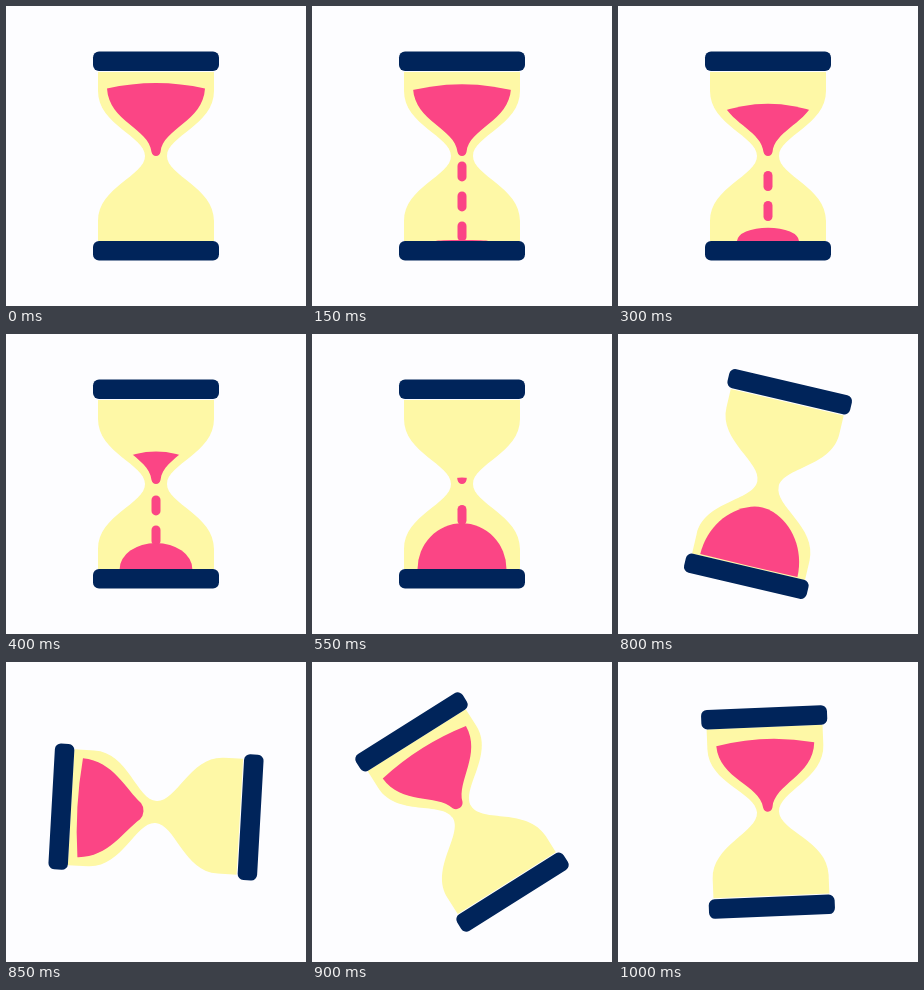
Animation of 300 by 300 pixels, one loop 1.05 s. Source, as an HTML page with a canvas:

```html
<!DOCTYPE html>
<html lang="en">
<head>
<meta charset="utf-8">
<title>Hourglass</title>
<style>
  html, body { margin: 0; width: 100%; height: 100%; overflow: hidden; background: #fdfdff; }
  canvas { display: block; width: 300px; height: 300px; }
</style>
</head>
<body>
<canvas id="stage" width="300" height="300"></canvas>
<script>
const ctx = document.getElementById('stage').getContext('2d');
const LOOP = 1050, STEP = 50, TURN = 750;
const PAPER = '#fdfdff', NAVY = '#00245a', GLASS = '#fef8a6', SAND = '#fb4585';

const clamp = v => Math.min(1, Math.max(0, v));
const span = (t, a, b) => clamp((t - a) / (b - a));
const smooth = s => s * s * (3 - 2 * s);
const mix = (a, b, k) => a + (b - a) * k;

// Cubic timing curve with control points (x1, 0) and (x2, 1)
function ease(x, x1, x2) {
  let lo = 0, hi = 1;
  for (let i = 0; i < 30; i++) {
    const s = (lo + hi) / 2, r = 1 - s;
    if (3 * r * r * s * x1 + 3 * r * s * s * x2 + s * s * s < x) lo = s; else hi = s;
  }
  return smooth(lo);
}

// Half outlines around the centre: corner, two controls, shoulder, tip control, tip, base control
const FUNNEL = [-49, -67.5, -47, -34, -7, -28, -4.5, -4, -3.5, 0, 0, 0, 0, -78.5];
const DOME = [-50, -85, -50, -58, -35, -34, -12, -27.8, -6, -26, 0, -26, 0, -85];

function sandPath(p) {
  ctx.beginPath();
  ctx.moveTo(p[0], p[1]);
  ctx.bezierCurveTo(p[2], p[3], p[4], p[5], p[6], p[7]);
  ctx.quadraticCurveTo(p[8], p[9], p[10], p[11]);
  ctx.quadraticCurveTo(-p[8], p[9], -p[6], p[7]);
  ctx.bezierCurveTo(-p[4], p[5], -p[2], p[3], -p[0], p[1]);
  ctx.quadraticCurveTo(p[12], p[13], p[0], p[1]);
}

function glass() {
  ctx.fillStyle = GLASS;
  ctx.beginPath();
  ctx.moveTo(-58, -84);
  ctx.lineTo(-58, -65);
  ctx.bezierCurveTo(-58, -31, -11, -20, -11, 0);
  ctx.bezierCurveTo(-11, 20, -58, 31, -58, 65);
  ctx.lineTo(-58, 85);
  ctx.lineTo(58, 85);
  ctx.lineTo(58, 65);
  ctx.bezierCurveTo(58, 31, 11, 20, 11, 0);
  ctx.bezierCurveTo(11, -20, 58, -31, 58, -65);
  ctx.lineTo(58, -84);
  ctx.fill();
}

function caps() {
  ctx.fillStyle = NAVY;
  for (const y of [-104.5, 85]) {
    ctx.beginPath();
    ctx.roundRect(-63, y, 126, 19.5, 6);
    ctx.fill();
  }
}

function upperSand(t) {
  const k = smooth(span(t, 110, 650));
  if (k >= 1) return;
  const y = mix(-73, 0, k), w = 49 * (1 - 0.66 * k) * 1.3, sag = 9.5;
  ctx.save();
  if (k > 0) {
    ctx.beginPath();
    ctx.moveTo(-w, y + sag);
    ctx.quadraticCurveTo(0, y - sag, w, y + sag);
    ctx.lineTo(w, 90);
    ctx.lineTo(-w, 90);
    ctx.clip();
  }
  sandPath(FUNNEL);
  ctx.fill();
  ctx.restore();
}

function stream(t) {
  const top = t < 550 ? 4 : mix(7.5, 85, span(t, 550, 690));
  const end = mix(4, 85, span(t, 0, 150));
  if (t === 0 || t > 600 || end <= top) return;
  ctx.strokeStyle = SAND;
  ctx.lineWidth = 9;
  ctx.lineCap = 'round';
  // Dashes 11 long, 30 apart, sliding down
  const slide = 19.5 + (t - 300) * 0.264;
  const first = ((slide % 30) + 30) % 30 - 30;
  for (let y = first; y < end; y += 30) {
    const a = Math.max(y, top), b = Math.min(y + 11, end);
    if (b <= a) continue;
    ctx.beginPath();
    ctx.moveTo(0, a);
    ctx.lineTo(0, b);
    ctx.stroke();
  }
}

function heap(t) {
  const k = smooth(span(t, 100, 750));
  if (k <= 0) return;
  ctx.beginPath();
  ctx.ellipse(0, 85, mix(25.5, 50, k), 59 * k, 0, Math.PI, 2 * Math.PI);
  ctx.fill();
}

function draw(t) {
  ctx.fillStyle = PAPER;
  ctx.fillRect(0, 0, 300, 300);
  ctx.save();
  ctx.translate(150, 150);
  const turn = ease(span(t, TURN, LOOP), 0.45, 0.09);
  ctx.rotate(Math.PI * turn);
  glass();
  ctx.fillStyle = SAND;
  if (t <= TURN) {
    upperSand(t);
    stream(t);
    heap(t);
  } else {
    ctx.save();
    ctx.rotate(Math.PI);
    sandPath(DOME.map((v, i) => mix(v, FUNNEL[i], turn)));
    ctx.fill();
    ctx.restore();
  }
  caps();
  ctx.restore();
}

const start = performance.now();
function tick() {
  const t = (performance.now() - start) % LOOP;
  draw(Math.floor(t / STEP) * STEP);
  requestAnimationFrame(tick);
}
tick();
</script>
</body>
</html>
```
